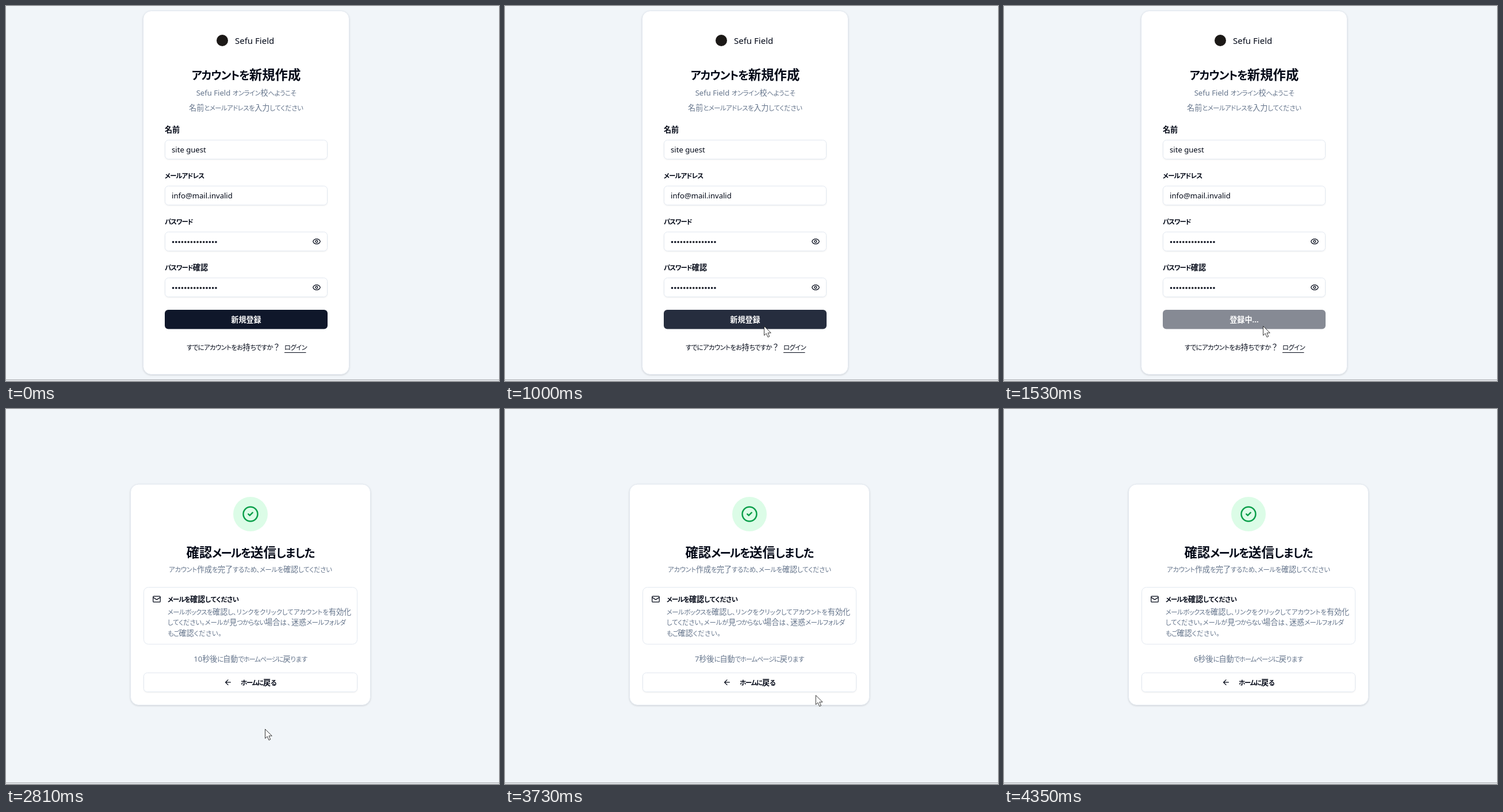
Animation, 857 px wide and 653 px high, one loop 4.78 s. Source, as an HTML page:

```html
<!DOCTYPE html>
<html lang="ja">
<head>
<meta charset="utf-8">
<style>
html, body { margin: 0; width: 100%; height: 100%; overflow: hidden; background: #f1f5f9; }
svg { display: block; width: 857px; height: 653px; }
text { font: 13.1px "Noto Sans", "Noto Sans CJK JP", sans-serif; fill: #020817; white-space: pre; }
.kana { font-size: .87em; font-feature-settings: "palt"; }
.mid { text-anchor: middle; }
.h1 { font-size: 22.4px; font-weight: 700; }
.brand { font-size: 15px; font-weight: 500; }
.bold { font-weight: 600; }
.muted { fill: #64748b; }
.white { fill: #fff; }
.card, .box { fill: #fff; stroke: #e2e8f0; }
.card { filter: drop-shadow(0 1px 1.5px rgb(0 0 0 / .14)); }
.soft { filter: drop-shadow(0 1px 1px rgb(0 0 0 / .06)); }
.icon { fill: none; stroke: #020817; stroke-width: 2; stroke-linecap: round; stroke-linejoin: round; }
</style>
</head>
<body>
<svg id="stage" viewBox="0 0 857 653"></svg>
<script>
const LOOP = 4780;
const stage = document.getElementById('stage');

const text = (x, y, str, cls = '') => `<text x="${x}" y="${y}" class="${cls}">${
  str.replace(/[ぁ-ヿ、。]+/g, run => `<tspan class="kana">${run}</tspan>`)}</text>`;
const rect = (x, y, w, h, r, cls) =>
  `<rect x="${x}" y="${y}" width="${w}" height="${h}" rx="${r}" class="${cls}"/>`;
const icon = (x, y, scale, shapes, style = '') =>
  `<g class="icon" style="${style}" transform="translate(${x} ${y}) scale(${scale})">${shapes}</g>`;
const field = (y, label, value) =>
  text(276, y - 13, label, 'bold') + rect(276.5, y + .5, 282, 33, 6, 'box soft') + text(288, y + 22, value);
const password = (y, label) => {
  const dots = Array.from({length: 15}, (_, i) =>
    `<circle cx="${290.5 + i * 5.32}" cy="${y + 18}" r="1.8" fill="#020817"/>`).join('');
  const eye = '<path d="M2.06 12.35a1 1 0 0 1 0-.7 10.75 10.75 0 0 1 19.88 0 1 1 0 0 1 0 .7 10.75 10.75 0 0 1-19.88 0"/><circle cx="12" cy="12" r="3"/>';
  return field(y, label, '') + dots + icon(532.5, y + 9.5, .623, eye);
};

const form = rect(238.5, 8.5, 358, 633, 14, 'card')
  + '<circle cx="376" cy="60" r="10" fill="#1c1917"/>'
  + text(398, 66, 'Sefu Field', 'brand')
  + text(417.5, 127.5, 'アカウントを新規作成', 'mid h1')
  + text(417.5, 155.5, 'Sefu Field オンライン校へようこそ', 'mid muted')
  + text(417.5, 181.5, '名前とメールアドレスを入力してください', 'mid muted')
  + field(233, '名前', 'site guest')
  + field(313, 'メールアドレス', 'info@mail.invalid')
  + password(393, 'パスワード')
  + password(473, 'パスワード確認')
  + '<rect id="submit" x="276" y="529" width="283" height="33.6" rx="6" fill="#0f172a"/>'
  + `<g id="idle">${text(417.5, 551, '新規登録', 'mid bold white')}</g>`
  + `<g id="busy">${text(417.5, 551, '登録中...', 'mid bold white')}</g>`
  + text(314, 599, 'すでにアカウントをお持ちですか？')
  + text(484, 599, 'ログイン')
  + '<path d="M484 603.5h37.5" stroke="#020817"/>';

const done = rect(216.5, 131, 417, 384.5, 14, 'card')
  + '<circle cx="425" cy="183" r="30" fill="#dcfce7"/>'
  + icon(410, 168, 1.247, '<circle cx="12" cy="12" r="10"/><path d="m9 12 2 2 4-4"/>', 'stroke:#0b9f4a')
  + text(425, 257.5, '確認メールを送信しました', 'mid h1')
  + text(425, 283.5, 'アカウント作成を完了するため、メールを確認してください', 'mid muted')
  + rect(239.5, 310.5, 371, 99, 8, 'box')
  + icon(254.5, 323.7, .623, '<rect x="2" y="4" width="20" height="16" rx="2"/><path d="m22 7-8.97 5.7a1.94 1.94 0 0 1-2.06 0L2 7"/>')
  + text(281, 336, 'メールを確認してください', 'bold')
  + text(281, 357.5, 'メールボックスを確認し、リンクをクリックしてアカウントを有効化', 'muted')
  + text(281, 376, 'してください。メールが見つからない場合は、迷惑メールフォルダ', 'muted')
  + text(281, 395, 'もご確認ください。', 'muted')
  + text(425, 440, '#秒後に自動でホームページに戻ります', 'mid muted').replace('#', '<tspan id="count">10</tspan>')
  + rect(239.5, 459.5, 371, 33, 6, 'box soft')
  + icon(378.5, 468.5, .623, '<path d="m12 19-7-7 7-7M19 12H5"/>')
  + text(408, 481, 'ホームに戻る', 'bold');

stage.innerHTML = `<rect width="857" height="653" fill="#f1f5f9"/>
  <g id="form">${form}</g><g id="done">${done}</g>
  <rect y="650" width="857" height="2" fill="#c3c6c9"/>
  <path id="cursor" d="M.5.5V16.6L4.2 13.2 7 19.6 9.7 18.4 7 12.2H12.3Z" fill="#fff" stroke="#222" stroke-width=".9"/>`;
const el = Object.fromEntries([...stage.querySelectorAll('[id]')].map(e => [e.id, e]));

// Kana are set tighter than kanji: an average pitch of .745em per run.
for (const run of stage.querySelectorAll('.kana')) {
  const size = parseFloat(getComputedStyle(run.parentNode).fontSize);
  const gap = .745 * size - run.getComputedTextLength() / run.textContent.length;
  run.style.letterSpacing = gap + 'px';
}

const lerp = (a, b, p) => a + (b - a) * p;
const easeOut = p => 1 - (1 - p) ** 2;
// Progress from a to b in n equal jumps
const steps = (t, a, b, n) => Math.min(n, Math.floor((t - a) / (b - a) * n + 1e-6)) / n;
const latest = (t, keys) => keys.filter(k => k[0] <= t).pop()[1];

function cursorAt(t) {
  if (t < 110 || t >= 4350) return null;
  if (t < 660) {
    const p = easeOut(steps(t, 110, 590, 7));
    return [lerp(784, 457, p), lerp(640, 562, p)];
  }
  if (t < 2810) return latest(t, [[660, [454, 561]], [730, [453, 559]], [800, [452, 557]], [1000, [450, 557]]]);
  if (t < 3350) {
    const p = steps(t, 2810, 3280, 6);
    return [lerp(450, 545, p) + 334 * Math.sin(Math.PI * p), lerp(557, 328, p)];
  }
  if (t < 3940) {
    const p = steps(t, 3350, 3870, 7);
    return [lerp(544, 538, p), lerp(330, 513, easeOut(p))];
  }
  const p = steps(t, 3940, 4350, 6) + 1 / 6;
  return [lerp(538, 760, p), lerp(513, 640, p)];
}

const show = (node, on) => node.setAttribute('visibility', on ? 'inherit' : 'hidden');

function draw(t) {
  const sent = t >= 2810, busy = t >= 1300;
  show(el.form, !sent);
  show(el.done, sent);
  show(el.idle, !busy);
  show(el.busy, busy);
  el.submit.setAttribute('opacity', latest(t,
    [[0, 1], [660, .98], [730, .93], [800, .9], [1420, .885], [1470, .68], [1530, .5]]));
  el.count.textContent = sent ? Math.max(6, 10 - Math.floor((t - 2770) / 310)) : 10;
  const pos = cursorAt(t);
  show(el.cursor, pos);
  if (pos) el.cursor.setAttribute('transform', `translate(${pos})`);
}

const start = performance.now();
function tick() {
  draw((performance.now() - start) % LOOP);
  requestAnimationFrame(tick);
}
tick();
</script>
</body>
</html>
```
